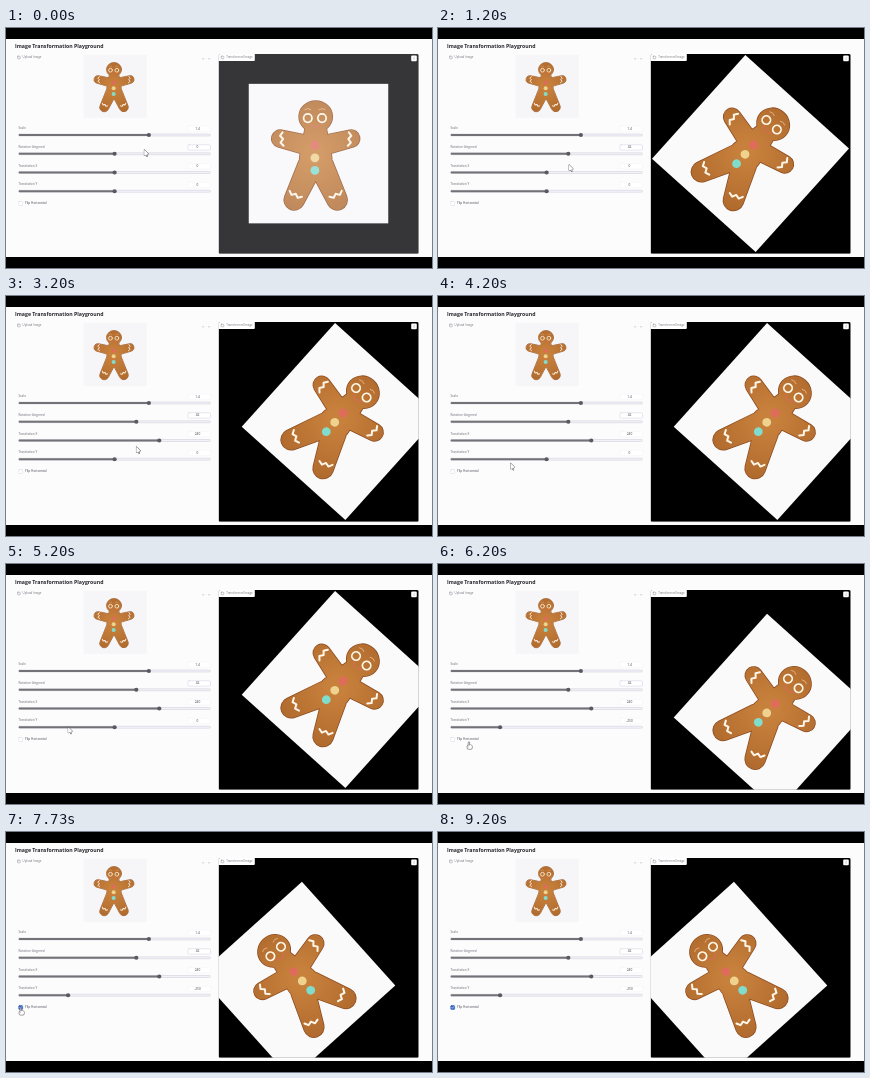
An HTML page with a canvas for the animation above (9.27 s loop, 426 by 240 pixels).

```html
<!DOCTYPE html>
<html lang="en">
<head>
<meta charset="utf-8">
<title>Image Transformation Playground</title>
<style>
html, body { margin: 0; width: 100%; height: 100%; overflow: hidden; background: #000; }
canvas { display: block; width: 100vw; height: 100vh; }
</style>
</head>
<body>
<canvas id="stage"></canvas>
<script>
const W = 426, H = 240, LOOP = 9270, STEP = 1000 / 15;
const TAU = Math.PI * 2;
const canvas = document.getElementById('stage');
const ctx = canvas.getContext('2d');

const panel = { x: 212.6, y: 26, w: 200.1, h: 199.8 };
const center = { x: 312.5, y: 125.6 };
const track = { left: 12.6, right: 204.4, middle: 108.6, reach: 93 };
const rowY = i => 107 + i * 18.75;
const handleX = (value, min, max) =>
  track.middle + ((value - min) / (max - min) * 2 - 1) * track.reach;

// Each edit: when it is clicked, its new value, and where the pointer is.
const RESULT_DELAY = 400;
const edits = {
  rotation: { at: 200, value: 42, x: handleX(42, -180, 180), y: rowY(1) },
  shiftX: { at: 2660, value: 240, x: handleX(240, -500, 500), y: rowY(2) },
  shiftY: { at: 5260, value: -250, x: handleX(-250, -500, 500), y: rowY(3) },
  flip: { at: 6990, value: 1, x: 14.8, y: 175.5 }
};
const stops = [
  { at: 0, x: 138.3, y: 122 },
  { at: 1200, x: 131, y: 137 },
  { at: 2200, x: 147.4, y: 143 },
  { at: 4200, x: 72.6, y: 167.5 },
  { at: 6200, x: 30.8, y: 178 },
  { at: 7730, x: 14.8, y: 175.8 },
  { at: 8700, x: 34, y: 234 },
  ...Object.values(edits)
].sort((a, b) => a.at - b.at);

const valueOf = (name, t) => t >= edits[name].at ? edits[name].value : 0;
const isPending = t => t < edits.rotation.at + RESULT_DELAY ||
  Object.values(edits).some(e => t >= e.at && t < e.at + RESULT_DELAY);

function box(x, y, w, h, r, fill, edge) {
  ctx.beginPath();
  ctx.roundRect(x, y, w, h, r);
  if (fill) { ctx.fillStyle = fill; ctx.fill(); }
  if (edge) { ctx.strokeStyle = edge; ctx.lineWidth = 0.5; ctx.stroke(); }
}

function dot(x, y, r, fill) {
  ctx.beginPath();
  ctx.arc(x, y, r, 0, TAU);
  ctx.fillStyle = fill;
  ctx.fill();
}

function arc(x, y, r, from, to, color, width) {
  ctx.beginPath();
  ctx.arc(x, y, r, from, to);
  ctx.strokeStyle = color;
  ctx.lineWidth = width;
  ctx.stroke();
}

function line(points, color, width) {
  ctx.beginPath();
  points.forEach(([x, y]) => ctx.lineTo(x, y));
  ctx.strokeStyle = color;
  ctx.lineWidth = width;
  ctx.lineCap = ctx.lineJoin = 'round';
  ctx.stroke();
}

function text(str, x, y, size, color, weight = 400, align = 'left') {
  ctx.font = `${weight} ${size}px "Open Sans", sans-serif`;
  ctx.textAlign = align;
  ctx.textBaseline = 'middle';
  ctx.fillStyle = color;
  ctx.fillText(str, x, y);
}

// Tapered limb: the outline around two circles.
function limb(path, x0, y0, r0, x1, y1, r1) {
  const a = Math.atan2(y1 - y0, x1 - x0);
  const b = Math.acos((r0 - r1) / Math.hypot(x1 - x0, y1 - y0));
  const part = new Path2D();
  part.arc(x0, y0, r0, a + b, a - b + TAU);
  part.arc(x1, y1, r1, a - b, a + b);
  part.closePath();
  path.addPath(part);
}

function cookieShape() {
  const path = new Path2D();
  path.ellipse(0, -37, 16.6, 15.6, 0, 0, TAU);
  limb(path, 0, -22, 11, 0, 5, 16);
  for (const side of [-1, 1]) {
    limb(path, side * 11, -9, 9.5, side * 35.5, -15, 8.5);
    limb(path, side * 6, 13, 12, side * 21.5, 46.3, 10);
  }
  return path;
}
const cookie = cookieShape();

function icing(x, y, angle) {
  ctx.save();
  ctx.translate(x, y);
  ctx.rotate(angle);
  const wave = [-2, -1, 0, 1, 2].map(i => [i * 3.4, i % 2 ? 1.4 : -1.4]);
  line(wave, '#fff6ea', 2);
  ctx.restore();
}

function gingerbread() {
  ctx.save();
  ctx.translate(-2.8, 0);
  const dough = ctx.createRadialGradient(-2, 0, 8, -2, 2, 60);
  dough.addColorStop(0, '#c8813c');
  dough.addColorStop(1, '#b06a2d');
  ctx.strokeStyle = '#8e4d22';
  ctx.lineWidth = 1.6;
  ctx.stroke(cookie);
  ctx.fillStyle = dough;
  ctx.fill(cookie);

  for (const side of [-1, 1]) {
    const x = side * 7.1 - 0.8;
    arc(x, -35.5, 4.2, 0, TAU, '#fff8e8', 1.7);
    arc(x, -40, 5, -2.2, -0.95, '#e5b98a', 0.8);
    icing(side * 34, -14.5, side * -1.5);
    icing(side * 20.5, 41.5, side * -0.45);
  }
  arc(-0.6, -32.5, 6, 0.5, Math.PI - 0.5, '#d66c55', 1.2);
  ['#df6c5b', '#eed28d', '#80dccb'].forEach((c, i) => dot(-0.8, i * 12.6 - 8.4, 4.4, c));
  ctx.restore();
}

function photo(x, y, scale, angle = 0, mirror = 1, paper = '#fafafb') {
  const size = 139.5;
  ctx.save();
  ctx.translate(x, y);
  ctx.scale(scale * mirror, scale);
  ctx.rotate(angle);
  ctx.fillStyle = paper;
  ctx.fillRect(-size / 2, -size / 2, size, size);
  gingerbread();
  ctx.restore();
}

function slider(row, label, value, min, max) {
  const y = rowY(row), x = handleX(value, min, max);
  text(label, 12.4, y - 6.8, 3.15, '#6a6a74');
  box(182, y - 9, 22.5, 5.4, 1, '#fff', row === 1 ? '#d0cfe2' : '#f0f0f5');
  text(String(value), 191.5, y - 6.3, 3.2, '#3c3c48', 400, 'center');
  box(track.left, y - 1, track.right - track.left, 2, 1, '#f3f1f9', '#c9c8d2');
  box(track.left, y - 1, x - track.left, 2, 1, '#737377');
  dot(x, y, 2.1, '#59595e');
}

function tab(label, x) {
  box(x, 28.2, 2.6, 2.6, 0.4, null, '#8a8a94');
  text(label, x + 5, 29.6, 2.9, '#777780');
}

function leftPanel(t) {
  text('Image Transformation Playground', 9, 18.3, 5.2, '#25252b', 700);
  photo(109.3, 58.3, 0.452, 0, 1, '#f6f5f7');
  tab('Upload Image', 11.6);
  for (const x of [196.3, 202.3]) line([[x, 30.8], [x + 1.5, 30.8]], '#a6a6b0', 0.5);

  slider(0, 'Scale', 1.4, 0.1, 2);
  slider(1, 'Rotation (degrees)', valueOf('rotation', t), -180, 180);
  slider(2, 'Translation X', valueOf('shiftX', t), -500, 500);
  slider(3, 'Translation Y', valueOf('shiftY', t), -500, 500);

  const checked = valueOf('flip', t);
  box(12.7, 173.5, 4, 4, 0.8, checked ? '#3561bd' : '#fff', checked ? '#3561bd' : '#d5d5dd');
  if (checked) line([[13.7, 175.6], [14.4, 176.3], [15.8, 174.6]], '#fff', 0.6);
  text('Flip Horizontal', 19, 175.4, 3.2, '#45454d');
}

function rightPanel(t) {
  const { x, y, w, h } = panel;
  const shown = t - RESULT_DELAY;
  const mirror = valueOf('flip', shown) ? -1 : 1;
  const pxPerUnit = 0.0905;
  const dx = valueOf('shiftX', shown) * pxPerUnit * mirror;
  const dy = -valueOf('shiftY', shown) * pxPerUnit;
  const angle = valueOf('rotation', shown) * Math.PI / 180;

  ctx.save();
  ctx.beginPath();
  ctx.roundRect(x, y, w, h, 1.5);
  ctx.clip();
  ctx.fillStyle = '#000';
  ctx.fillRect(x, y, w, h);
  photo(center.x + dx, center.y + dy, 1, angle, mirror);
  if (isPending(t)) {
    ctx.fillStyle = 'rgba(244,244,255,0.22)';
    ctx.fillRect(x, y, w, h);
  }
  box(x - 1, y - 1, 37.2, 8, 1, '#fff');
  box(405.2, 27.6, 5.6, 5.6, 1, '#fff');
  ctx.restore();
  tab('Transformed Image', 215.2);
  line([[408, 29.2], [408, 31.5]], '#a0a0a8', 0.5);
}

function pointerAt(t) {
  const next = stops.findIndex(s => s.at > t);
  if (next < 0) return stops[stops.length - 1];
  const a = stops[next - 1], b = stops[next];
  const u = (t - a.at) / (b.at - a.at), k = u * u * (3 - 2 * u);
  return { x: a.x + (b.x - a.x) * k, y: a.y + (b.y - a.y) * k };
}

function pointer(t) {
  const { x, y } = pointerAt(t);
  const edge = '#3c3c42';
  ctx.save();
  ctx.translate(x, y);
  if (t > 5930 && t < 8000) {
    box(-1.7, 3, 5.2, 4.3, 1.4, '#fff', edge);
    box(-0.6, 0, 1.4, 5, 0.7, '#fff', edge);
    ctx.fillStyle = '#fff';
    ctx.fillRect(-0.4, 3.3, 3, 2);
  } else {
    const tail = [[1.9, 4], [2.8, 6.2]];
    line(tail, edge, 1.5);
    ctx.beginPath();
    ctx.moveTo(0, 0);
    ctx.lineTo(0, 5.6);
    ctx.lineTo(4, 4);
    ctx.closePath();
    ctx.fillStyle = '#fff';
    ctx.lineWidth = 0.6;
    ctx.stroke();
    ctx.fill();
    line(tail, '#fff', 0.7);
  }
  ctx.restore();
}

function draw(t) {
  ctx.fillStyle = '#fcfcfd';
  ctx.fillRect(0, 0, W, H);
  leftPanel(t);
  rightPanel(t);
  pointer(t);
  ctx.fillStyle = '#000';
  ctx.fillRect(0, 0, W, 11);
  ctx.fillRect(0, 229, W, 11);
}

function resize() {
  const ratio = window.devicePixelRatio || 1;
  canvas.width = Math.round(innerWidth * ratio);
  canvas.height = Math.round(innerHeight * ratio);
}

const start = performance.now();
function tick() {
  const t = (performance.now() - start) % LOOP;
  ctx.setTransform(canvas.width / W, 0, 0, canvas.height / H, 0, 0);
  draw(Math.floor(t / STEP + 0.02) * STEP);
  requestAnimationFrame(tick);
}
addEventListener('resize', resize);
resize();
tick();
</script>
</body>
</html>
```
